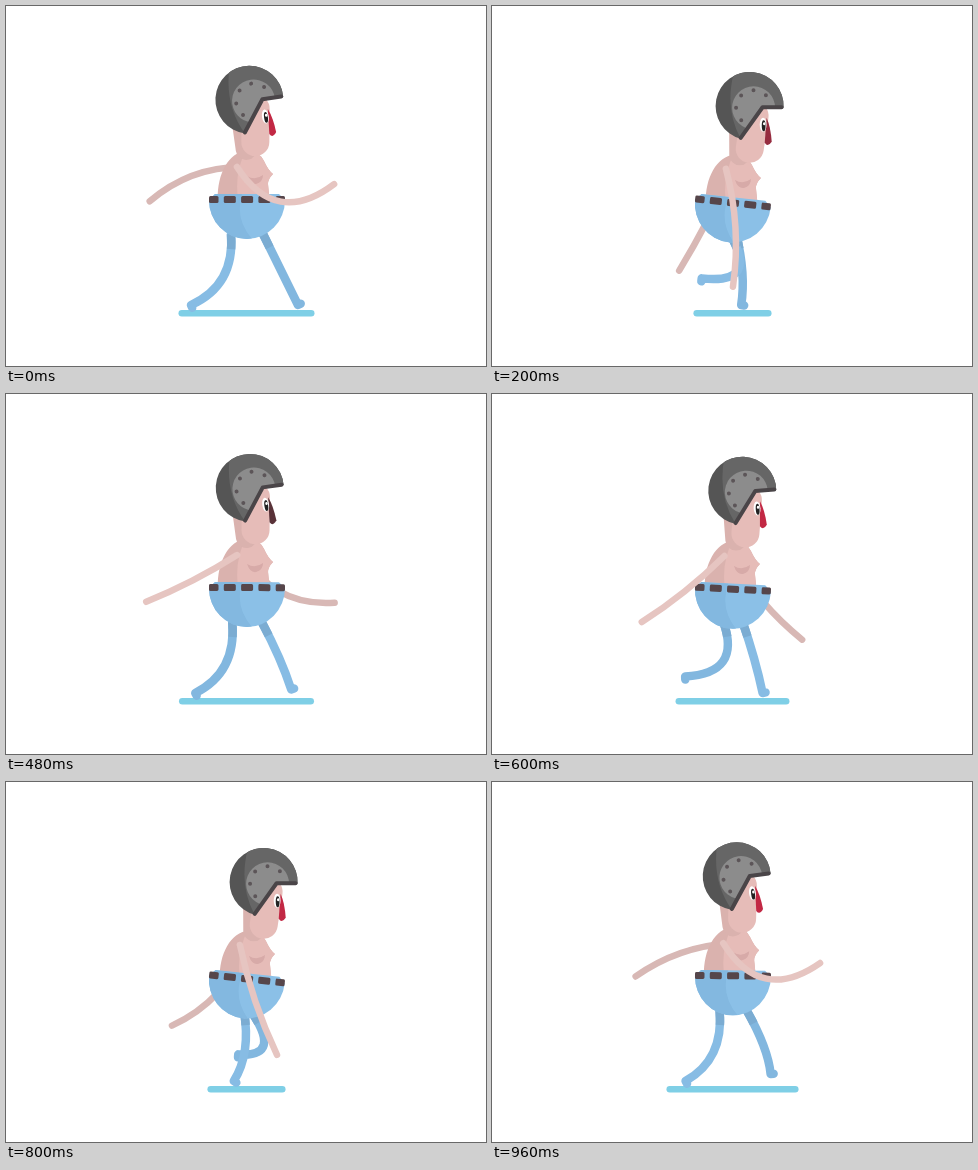
Recreate the animation shown at these times as an HTML page with a canvas. Size 480 by 360 pixels, loop 1 s.

```html
<!DOCTYPE html>
<html>
<head>
<meta charset="utf-8">
<title>Walk cycle</title>
<style>
html, body { margin: 0; height: 100%; overflow: hidden; background: #fff; }
canvas { display: block; }
</style>
</head>
<body>
<canvas id="stage" width="480" height="360"></canvas>
<script>
const ctx = document.getElementById('stage').getContext('2d');
const LOOP = 1000, STEP = 40;
const { sin, cos, abs, PI } = Math;

function fill(path, color) {
  ctx.fillStyle = color;
  ctx.fill(typeof path === 'string' ? new Path2D(path) : path);
}

function stroke(path, color, width, cap = 'round') {
  ctx.strokeStyle = color;
  ctx.lineWidth = width;
  ctx.lineCap = cap;
  ctx.lineJoin = 'round';
  ctx.stroke(new Path2D(path));
}

function oval(x, y, rx, ry, color) {
  const p = new Path2D();
  p.ellipse(x, y, rx, ry, 0, 0, 7);
  fill(p, color);
}

function group(draw) {
  ctx.save();
  draw();
  ctx.restore();
}

// Half a cycle swings the foot forward, the other half slides it back.
function leg(phase, color) {
  const p = phase % 1, s = p * 2 % 1, swing = p < .5;
  const k = swing ? s : 1 - s;
  const lift = swing ? sin(PI * s) : 0;
  const hip = 225 + 32 * k;
  const x = 185 + 107 * (swing ? k ** 1.6 : k), y = 299 - 28 * lift;
  const bend = (swing ? 24 * (1 - s) : 24 * s ** 1.3) + 31 * lift;
  const kneeX = (hip + x) / 2 + bend, kneeY = (228 + y) / 2 + .65 * bend;
  const len = Math.hypot(x - kneeX, y - kneeY);
  const toe = `l${(y - kneeY) / len * 3} ${(kneeX - x) / len * 3}`;
  const limb = `M${hip} 228Q${kneeX} ${kneeY} ${x} ${y}`;
  stroke(limb + toe, color, 8.5);
  group(() => {
    ctx.setLineDash([15, 999]);
    stroke(limb, '#7bacd2', 8.5, 'butt');
  });
}

// A pendulum whose elbow bends twice per swing; angles in degrees from straight down.
function arm(phase, x, y, { mid, swing, sag, curl, color }) {
  const w = 2 * PI * phase;
  const a = (mid + swing * cos(w) - sag * sin(w) ** 2 - 8 * sin(w)) * PI / 180;
  const len = 118 - 20 * sin(a) ** 2;
  const bend = 5 + curl * cos(w) + 20 * cos(2 * w) - 10 * sin(w);
  const dx = len * sin(a), dy = len * cos(a);
  stroke(`M${x} ${y}q${dx / 2 - bend * cos(a)} ${dy / 2 + bend * sin(a)} ${dx} ${dy}`, color, 6.5);
}

const NEAR = { mid: 9, swing: 71, sag: 22, curl: 28, color: '#e6c5c1' };
const FAR = { mid: -4, swing: 66, sag: 12, curl: 6, color: '#d8b8b5' };

function torso() {
  const shape = new Path2D('M212 198C210 172 220 150 237 145Q252 143 258 155Q262 164 267 168Q262 173 262 178L264 198Z');
  fill(shape, '#dab2ae');
  ctx.clip(shape);
  fill('M240 144Q227 168 233 200L270 200L270 144Z', '#e6bcb8');
  fill('M241 170Q244 179 250 178Q257 176 257 169Q249 175 241 170Z', '#d7aaa8');
}

function shorts() {
  const bowl = new Path2D('M203 194L209 188H273L279 194A38 39 0 0 1 203 194Z');
  fill(bowl, '#8bc0e7');
  group(() => {
    ctx.clip(bowl);
    fill('M200 188L236 188Q228 215 249 236L200 236Z', '#83b8e0');
  });
  ctx.fillStyle = '#56464b';
  for (let x = 200.5; x < 279; x += 17.3) {
    const left = Math.max(x, 203), right = Math.min(x + 12, 279);
    ctx.beginPath();
    ctx.roundRect(left, 190, right - left, 7, 1.5);
    ctx.fill();
  }
}

function head(nose) {
  stroke('M248 125V149', '#dab2ae', 21);
  stroke('M263 110L258 143', '#e6bcb8', 28);
  fill('M275 112Q279 121 280 136Q276 142 273 137Z', nose);
  oval(271.5, 119, 3.4, 7, '#fff');
  oval(272, 120, 1.9, 5.5, '#222');
  oval(272.5, 118, 1.2, 1.5, '#fff');

  const shell = new Path2D('M292 102A34 34 0 1 0 249 133L272 102Z');
  fill(shell, '#555');
  group(() => {
    ctx.clip(shell);
    fill('M245 58Q231 100 249 133L272 102H300V58Z', '#666');
    oval(262, 102, 21.5, 21.5, '#8c8c8c');
    for (let a = .75; a < 2; a += .25) {
      oval(262 + 17.5 * cos(a * PI), 102 + 17.5 * sin(a * PI), 2, 2, '#5c5558');
    }
  });
  stroke('M249 132L271 101.5H290', '#4a4548', 4);
}

// p runs from 0 to 1 over two steps.
function draw(p) {
  const lean = 1 - abs(cos(2 * PI * p)) ** 3;
  const half = 52 + 16 * cos(4 * PI * p);
  const dark = p < .55 ? p * 2 : 0;
  const nose = `rgb(${194 - 109 * dark}, ${40 + 10 * dark}, ${68 - 12 * dark})`;
  ctx.fillStyle = '#fff';
  ctx.fillRect(0, 0, 480, 360);

  stroke(`M${243.8 - half} 307.2H${237.2 + half}`, '#7fcfe6', 6.6);
  arm(p + .5, 238 + 2 * lean, 161 + 3 * lean, FAR);
  leg(p + .5, '#82b7df');
  leg(p, '#87bce4');
  group(() => {
    ctx.translate(2 * lean, 4 * lean);
    torso();
  });
  group(() => {
    ctx.translate(241, 193 + 3.5 * lean);
    ctx.rotate(.11 * lean);
    ctx.translate(-241, -193);
    shorts();
  });
  group(() => {
    ctx.translate(251 + 7 * lean, 148 + 7 * lean);
    ctx.rotate(.14 * (lean - 1));
    ctx.translate(-258, -155);
    head(nose);
  });
  arm(p, 231 + 3 * lean, 161 + 2 * lean, NEAR);
}

function tick(now) {
  draw(Math.floor(now % LOOP / STEP) * STEP / LOOP);
  requestAnimationFrame(tick);
}
requestAnimationFrame(tick);
</script>
</body>
</html>
```
